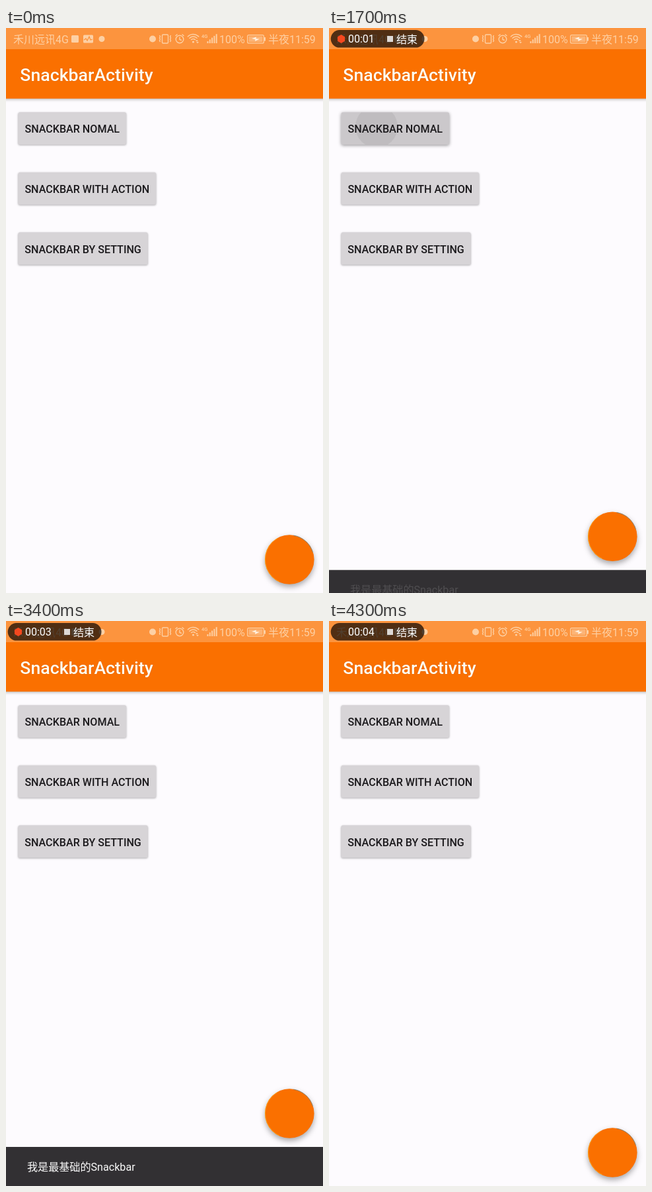
Write an HTML page with a canvas that moves like this. It is 480x853 px and loops after 4.4 s.

```html
<!DOCTYPE html>
<html lang="zh">
<head>
<meta charset="utf-8">
<title>SnackbarActivity</title>
<style>
html, body { margin: 0; width: 100%; height: 100%; overflow: hidden; background: #fdfbfe; }
canvas { display: block; width: 480px; height: 853px; }
</style>
</head>
<body>
<canvas id="stage"></canvas>
<script>
const W = 480, H = 853, LOOP = 4400, STEP = 100, TAU = Math.PI * 2;
const ORANGE = '#fa7000', STATUS = '#fc943e', ICON = '#fdd0a4';
const FONT = 'Roboto, "Noto Sans CJK SC", "Noto Sans CJK", sans-serif';
const BAR_H = 59, SHOW = 1603, HIDE = 3636;
const canvas = document.getElementById('stage');
const ctx = canvas.getContext('2d');
const dpr = window.devicePixelRatio || 1;
canvas.width = W * dpr;
canvas.height = H * dpr;

const ramp = (t, a, b) => Math.min(1, Math.max(0, (t - a) / (b - a)));
const lerp = (a, b, k) => a + (b - a) * k;

// cubic-bezier(0.4, 0, 0.2, 1)
function fastOutSlowIn(x) {
  let lo = 0, hi = 1, s = x;
  for (let i = 0; i < 24; i++) {
    s = (lo + hi) / 2;
    const bx = 1.2 * s * (1 - s) ** 2 + 0.6 * s * s * (1 - s) + s ** 3;
    if (bx < x) lo = s; else hi = s;
  }
  return 3 * s * s * (1 - s) + s ** 3;
}

function text(str, x, y, size, color, weight = 400, align = 'left') {
  ctx.font = `${weight} ${size}px ${FONT}`;
  ctx.textAlign = align;
  ctx.fillStyle = color;
  ctx.fillText(str, x, y);
}

function rect(x, y, w, h, color) {
  ctx.fillStyle = color;
  ctx.fillRect(x, y, w, h);
}

function rounded(x, y, w, h, r) {
  ctx.beginPath();
  ctx.roundRect(x, y, w, h, r);
}

function circle(x, y, r, color) {
  ctx.beginPath();
  ctx.arc(x, y, r, 0, TAU);
  ctx.fillStyle = color;
  ctx.fill();
}

function arc(x, y, r, a, b) {
  ctx.beginPath();
  ctx.arc(x, y, r, a, b);
  ctx.stroke();
}

function poly(points, fill) {
  ctx.beginPath();
  points.forEach(([x, y]) => ctx.lineTo(x, y));
  if (fill) ctx.fill(); else ctx.stroke();
}

function shadow(color, blur, dy) {
  ctx.shadowColor = color;
  ctx.shadowBlur = blur * dpr;
  ctx.shadowOffsetY = dy * dpr;
}

function layer(draw) {
  ctx.save();
  draw();
  ctx.restore();
}

function leftIcons() {
  text('禾川远讯4G', 11, 22.5, 16, ICON);
  ctx.fillStyle = ICON;
  rounded(99, 11, 11, 11, 1.5);
  ctx.fill();
  rounded(117, 10.5, 15, 12, 1.5);
  ctx.fill();
  ctx.strokeStyle = STATUS;
  ctx.lineWidth = 1.3;
  poly([[118, 18], [121, 16], [123, 19], [126, 13], [128, 18], [131, 17]]);
  circle(145, 16.5, 4.5, ICON);
}

function rightIcons() {
  ctx.strokeStyle = ICON;
  ctx.fillStyle = ICON;
  ctx.lineWidth = 1.4;
  circle(222, 16.5, 5, ICON);

  // vibrate
  rounded(236.5, 10, 9, 13, 1.5);
  ctx.stroke();
  for (const [x, d] of [[232.5, 1], [249.5, -1]])
    poly([[x, 11], [x + d, 13], [x, 15], [x + d, 17], [x, 19], [x + d, 21]]);

  // alarm
  arc(263, 17, 5.8, 0, TAU);
  poly([[263, 13.5], [263, 17.5], [266, 18.5]]);
  poly([[256.5, 12], [259.5, 9.5]]);
  poly([[266.5, 9.5], [269.5, 12]]);

  // wifi
  for (const r of [4.5, 8, 11.5]) arc(283.5, 21, r, -Math.PI * 0.77, -Math.PI * 0.23);
  circle(283.5, 21, 1.6, ICON);
  poly([[287, 20], [291, 20], [289, 17.8]], true);
  poly([[288, 21], [292, 21], [290, 23.2]], true);

  text('4G', 296, 15, 7.5, ICON, 500);
  for (let i = 0; i < 5; i++) {
    const h = 3 + i * 2.7;
    rect(304.5 + i * 3.3, 23 - h, 2, h, ICON);
  }
  text('100%', 323, 22.5, 16, ICON);

  // battery
  ctx.lineWidth = 1.2;
  rounded(365.6, 10.6, 24.8, 12.3, 2);
  ctx.stroke();
  rect(391, 14, 2, 5.5, ICON);
  layer(() => {
    ctx.globalAlpha = 0.55;
    rect(367.5, 12.5, 21, 8.5, ICON);
  });
  ctx.fillStyle = '#fff0df';
  poly([[372, 16], [379, 13.5], [378.5, 16], [384, 16.5], [377, 20], [377.5, 17.2]], true);

  text('半夜11:59', 397, 22.5, 16, ICON);
}

function header() {
  layer(() => {
    shadow('rgba(0,0,0,.32)', 5, 1.5);
    rect(-10, 32, W + 20, 74.6, ORANGE);
  });
  rect(0, 0, W, 32, STATUS);
  leftIcons();
  rightIcons();
  layer(() => {
    shadow('rgba(120,70,0,.3)', 1.5, 0.6);
    text('SnackbarActivity', 21.33, 79.8, 26.67, '#fffdf4', 500);
  });
}

function button(label, y, w, press, ripple) {
  const x = 18.5, h = 48.8;
  layer(() => {
    shadow(`rgba(0,0,0,${lerp(0.34, 0.42, press)})`, lerp(3, 5, press), lerp(0.8, 1.3, press));
    rounded(x, y, w, h, 2.5);
    ctx.fillStyle = '#d7d4d7';
    ctx.fill();
  });
  if (press > 0) layer(() => {
    rounded(x, y, w, h, 2.5);
    ctx.clip();
    rect(x, y, w, h, `rgba(0,0,0,${0.055 * press})`);
    if (ripple > 0)
      circle(lerp(66, 91, ripple), lerp(147, 155, ripple), lerp(15, 86, ripple),
        `rgba(0,0,0,${0.06 * press})`);
  });
  text(label, x + w / 2, y + 31, 16.1, '#1b191c', 500, 'center');
}

function fab(y) {
  const x = 429.3, r = 37.3;
  layer(() => {
    shadow('rgba(0,0,0,.34)', 9, 4);
    circle(x, y, r, ORANGE);
  });
  ctx.lineWidth = 1;
  ctx.strokeStyle = 'rgba(110,135,140,.8)';
  arc(x, y, r - 0.4, -1.4, -0.3);
  ctx.strokeStyle = 'rgba(255,190,30,.6)';
  arc(x, y, r - 0.4, 2, 4.2);
}

function snackbar(shown, alpha) {
  const top = H - BAR_H * shown;
  rect(0, top, W, BAR_H + 1, '#323033');
  layer(() => {
    ctx.globalAlpha = alpha;
    text('我是最基础的Snackbar', 32, top + 36, 16.1, '#fafafa');
  });
}

function pointer(x, y, alpha) {
  layer(() => {
    ctx.globalAlpha = alpha;
    circle(x, y, 15, 'rgba(245,243,246,.8)');
    ctx.lineWidth = 2;
    ctx.strokeStyle = 'rgba(165,163,168,.75)';
    arc(x, y, 15, 0, TAU);
  });
}

function recorder(t) {
  if (t < 100) return;
  const sec = t < 1000 ? 0 : t < 2200 ? 1 : t < 2900 ? 2 : t < 3900 ? 3 : 4;
  const lit = [[400, 900], [1400, 2200], [2400, 2900], [3400, 3900]].some(([a, b]) => t >= a && t < b);
  layer(() => {
    ctx.globalAlpha = ramp(t, 0, 200);
    rounded(2.7, 3, 141.8, 26.6, 13.3);
    ctx.fillStyle = 'rgba(14,8,4,.72)';
    ctx.fill();
    if (lit) {
      ctx.fillStyle = '#f4481f';
      poly(Array.from({ length: 6 }, (_, i) => {
        const a = (i + 0.5) * TAU / 6;
        return [18.5 + 6.4 * Math.cos(a), 16.5 + 6.4 * Math.sin(a)];
      }), true);
    }
    text('00:0' + sec, 29, 22.3, 16, '#fff');
    rect(88, 12, 9, 9, '#dcd8d5');
    text('结束', 102, 22.5, 16, '#fff');
  });
}

function draw(t) {
  ctx.setTransform(dpr, 0, 0, dpr, 0, 0);
  rect(0, 0, W, H, '#fdfbfe');

  const leaving = t >= HIDE;
  const shown = leaving
    ? 1 - fastOutSlowIn(ramp(t, HIDE, HIDE + 250))
    : fastOutSlowIn(ramp(t, SHOW, SHOW + 250));
  const alpha = leaving ? 1 - ramp(t, HIDE, HIDE + 180) : ramp(t, SHOW + 70, SHOW + 250);
  const press = ramp(t, 1300, 1600) * (1 - ramp(t, 1750, 2100));
  const ripple = ramp(t, 1590, 2050);

  header();
  button('SNACKBAR NOMAL', 127.2, 163.5, press, ripple);
  button('SNACKBAR WITH ACTION', 217.9, 208.6, 0, 0);
  button('SNACKBAR BY SETTING', 308.6, 196.1, 0, 0);
  fab(802.5 - BAR_H * shown);
  if (shown > 0) snackbar(shown, alpha);
  recorder(t);
  if (t >= 1300 && t < 1600) pointer(66, 147, ramp(t, 1200, 1325));
  if (t >= 4000 && t < 4300) pointer(121.5, 14, ramp(t, 3900, 4100) * 0.8);
}

const start = performance.now();
function tick() {
  const t = (performance.now() - start) % LOOP;
  draw(Math.floor(t / STEP) * STEP);
  requestAnimationFrame(tick);
}
tick();
</script>
</body>
</html>
```
